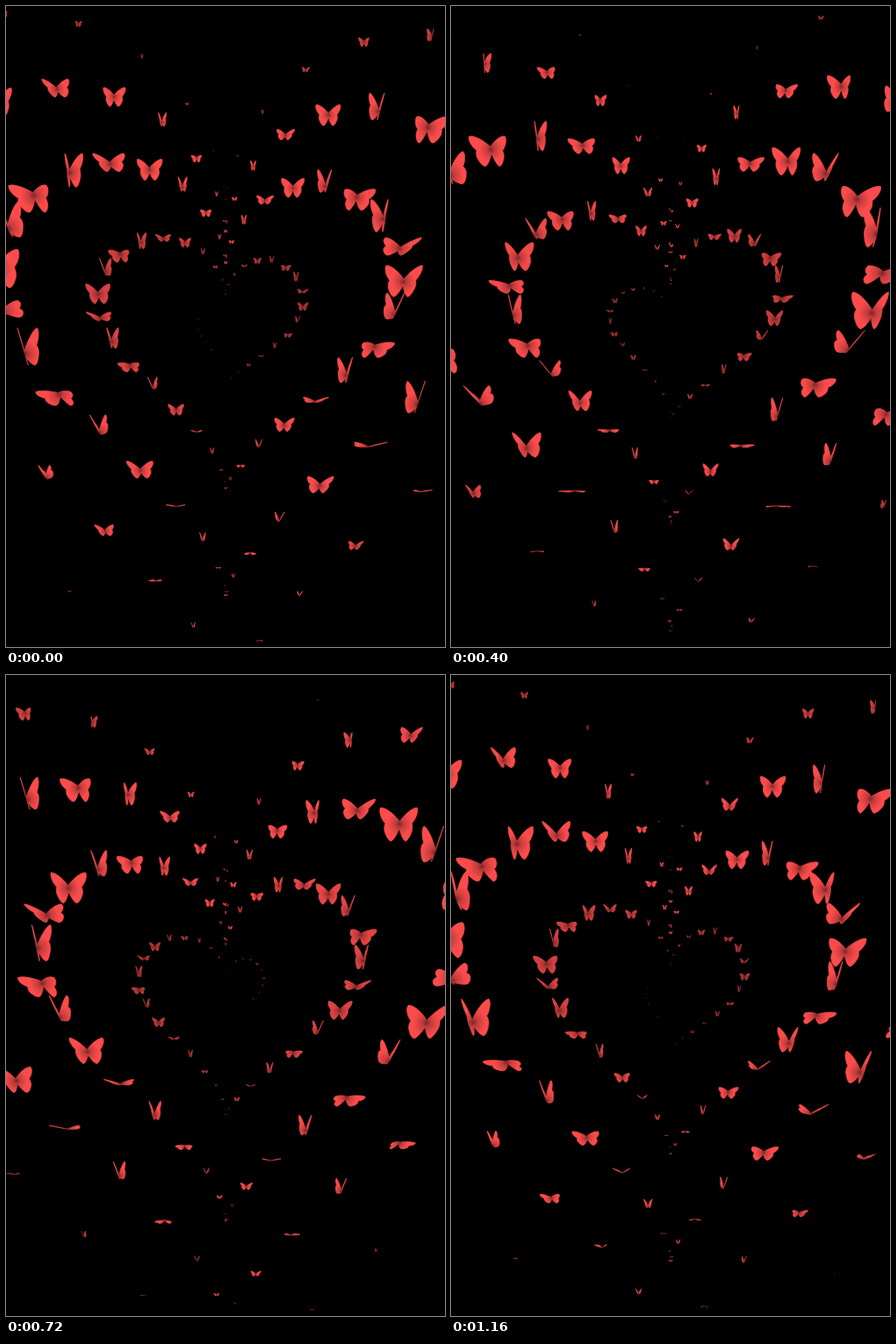
An HTML page with a canvas for the animation above (1200 ms loop, 500 px wide and 730 px high).

```html
<!DOCTYPE html>
<html lang="en">
<head>
<meta charset="utf-8">
<title>Butterfly hearts</title>
<style>
html, body { margin: 0; width: 100%; height: 100%; overflow: hidden; background: #000; }
canvas { display: block; }
</style>
</head>
<body>
<canvas id="stage" width="500" height="730"></canvas>
<script>
const ctx = document.getElementById('stage').getContext('2d');
const { sin, cos, atan, PI } = Math;
const TAU = 2 * PI, RAD = PI / 180;
const LOOP = 1200, STEP = 40;
const COUNT = 40;          // butterflies released per loop
const LIFE = 5;            // loops a butterfly lives
const CX = 250.2, CY = 364.5;
const SPEED = 7.16;        // heart units travelled per loop
const VIEW = 540;          // viewing distance

// One wing: x runs along the span, y along the body towards the head.
const wing = new Path2D(`M0 .07 C.1 .2 .36 .43 .5 .4 C.54 .3 .47 .12 .36 .01
  C.39 -.06 .39 -.18 .34 -.26 C.3 -.36 .22 -.46 .17 -.42
  C.1 -.36 .04 -.22 0 -.12 Z`);

function heart(a) {
  return {
    x: 16 * sin(a) ** 3,
    y: 5 * cos(2 * a) + 2 * cos(3 * a) + cos(4 * a) - 13 * cos(a)
  };
}

function butterfly(x, y, size, flap, light) {
  const open = RAD * (25 + 45 * cos(TAU * (flap - 0.3)));
  const pitch = RAD * (42 + 23 * cos(TAU * (flap - 0.07))) - atan((y - CY) / VIEW);
  const yaw = atan((x - CX) / VIEW);
  const shape = new Path2D();
  for (const side of [-1, 1]) {
    shape.addPath(wing, new DOMMatrix([
      size * (side * cos(open) * cos(yaw) - sin(open) * sin(pitch) * sin(yaw)),
      -size * sin(open) * cos(pitch),
      size * cos(pitch) * sin(yaw),
      -size * sin(pitch),
      x, y
    ]));
  }
  const fill = ctx.createRadialGradient(x, y, 0, x, y, size * 0.3);
  fill.addColorStop(0, '#7c2727');
  fill.addColorStop(0.35, '#c43c3c');
  fill.addColorStop(1, '#fb4b4b');
  ctx.globalAlpha = light;
  ctx.fillStyle = ctx.strokeStyle = fill;
  ctx.fill(shape, 'nonzero');
  ctx.lineWidth = Math.min(0.7, size * 0.03);
  ctx.stroke(shape);
}

function draw(ms) {
  ctx.globalAlpha = 1;
  ctx.fillStyle = '#000';
  ctx.fillRect(0, 0, 500, 730);
  const now = 0.018 + ms / LOOP;
  for (let n = LIFE + 1; n >= 0; n--) {
    for (let i = 0; i < COUNT; i++) {
      const age = now + n - i / COUNT;
      if (age <= 0 || age >= LIFE) continue;
      const a = TAU * i / COUNT;
      const dir = heart(a);
      const grow = sin(PI * age / LIFE) ** 2;
      const size = 56 * grow * Math.max(0.08, Math.abs(sin(a)) ** 1.75);
      if (size < 0.4) continue;
      const dist = SPEED * age;
      butterfly(CX + dir.x * dist, CY + dir.y * dist, size,
        ms / (LOOP / 2) + 0.4 * i, Math.min(1, 0.55 + 0.6 * grow));
    }
  }
}

const start = performance.now();
function tick() {
  const ms = Math.max(0, performance.now() - start) % LOOP;
  draw(Math.floor(ms / STEP) * STEP);
  requestAnimationFrame(tick);
}
tick();
</script>
</body>
</html>
```
